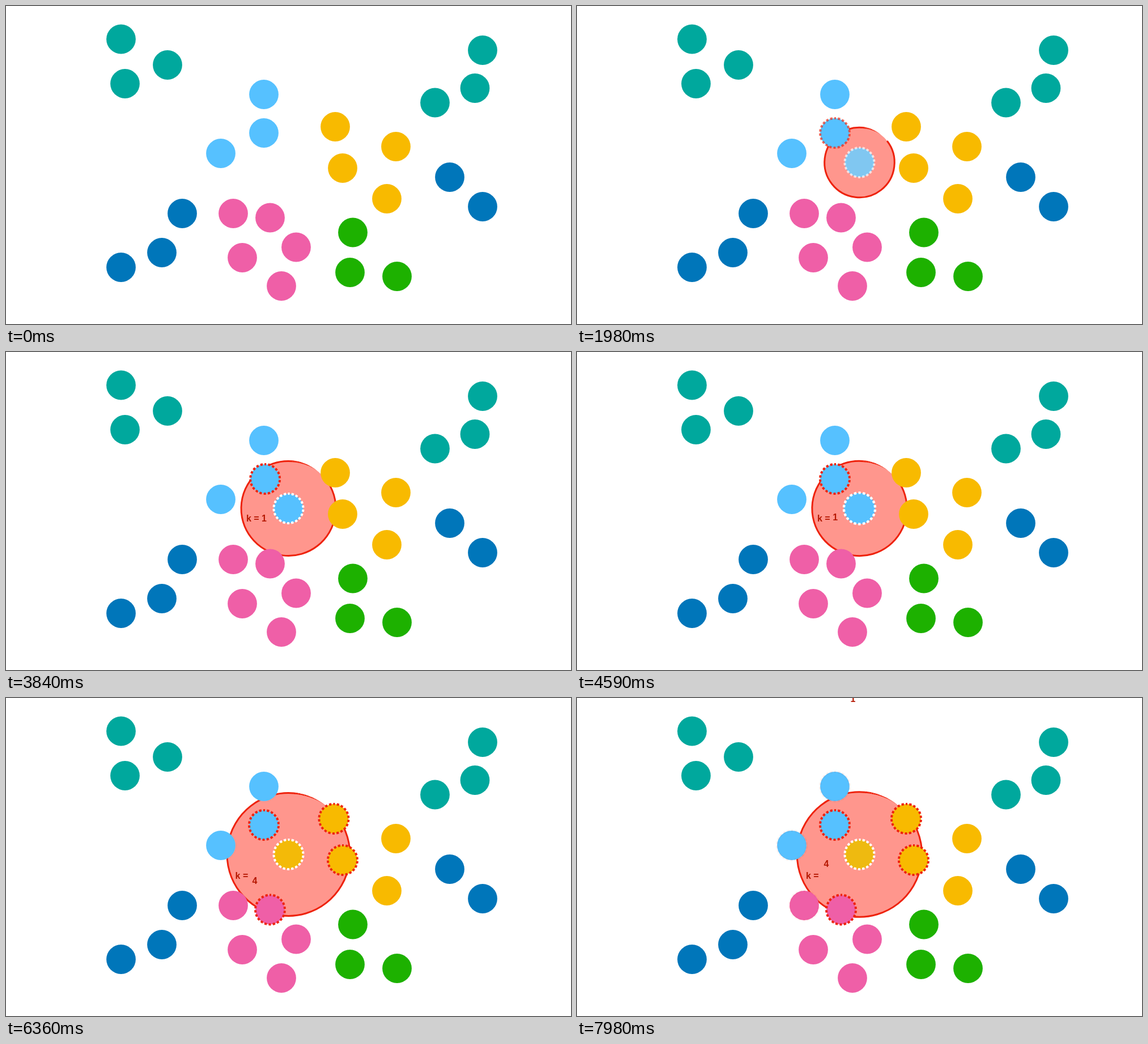
An HTML page with a canvas for the animation above (8 s loop, 997x561 px).

```html
<!DOCTYPE html>
<html lang="en">
<head>
<meta charset="utf-8">
<title>Nearest neighbours</title>
<style>
  html, body { margin: 0; width: 100%; height: 100%; overflow: hidden; background: #fff; }
  canvas { display: block; }
</style>
</head>
<body>
<canvas id="stage" width="997" height="561"></canvas>
<script>
const ctx = document.getElementById('stage').getContext('2d');
const LOOP = 8000, TAU = Math.PI * 2, R = 25.9;
const SKY = [86, 193, 255], GOLD = [248, 186, 0], GRAY = [211, 212, 214];
const RED = '#ee220c';
const center = { x: 498.5, y: 276 };

// Each dot: x, y, stage at which it becomes a neighbour, start of its jiggle
const groups = {
  '#00a89d': [[203, 58.5], [285, 104], [210, 137], [841, 78], [827.5, 145], [757, 170.5]],
  '#56c1ff': [[455, 156, 2], [455, 224, 0, 3630], [379, 260, 2]],
  '#f8ba00': [[581, 213, 1, 6318], [688, 248], [594, 286, 1, 6620], [672, 340]],
  '#0076ba': [[311, 366], [275, 435], [203, 461], [783, 302], [841, 354]],
  '#ef5fa7': [[401, 366, 2], [466, 373.5, 1], [417, 444], [512, 425.5], [486, 494]],
  '#1db100': [[612, 399.5], [607, 470], [690, 477]]
};

const clamp = v => Math.min(1, Math.max(0, v));
const ramp = (t, from, to) => clamp((t - from) / (to - from));
const lerp = (a, b, p) => a + (b - a) * p;
const mix = (a, b, p) => a.map((v, i) => lerp(v, b[i], p));
const ease = (t, middle) => 1 / (1 + Math.exp((middle - t) / 205));

function disc(x, y, r, color) {
  ctx.fillStyle = color;
  ctx.beginPath();
  ctx.arc(x, y, r, 0, TAU);
  ctx.fill();
}

function dottedRing(x, y, color, alpha, scale = 1) {
  if (alpha < 0.02) return;
  const period = TAU * 26 * scale / 22;
  ctx.save();
  ctx.globalAlpha = alpha;
  ctx.strokeStyle = color;
  ctx.lineWidth = 4 * scale;
  ctx.setLineDash([period * 0.56, period * 0.44]);
  ctx.lineDashOffset = period * 0.28;
  ctx.beginPath();
  ctx.arc(x, y, 26 * scale, -TAU / 4, TAU * 3 / 4);
  ctx.stroke();
  ctx.restore();
}

function jiggle(t, start) {
  const u = ramp(t, start, start + 600);
  return -3.5 * Math.sin(2 * TAU * u) * (1 - u);
}

function pulse(t, start) {
  return 0.2 * Math.sin(Math.PI * ramp(t, start, start + 500));
}

// Range circle whose outline thins out at the upper right
function rangeCircle(outer) {
  const rad = Math.PI / 180, r = outer - 1.5;
  disc(center.x, center.y, r, '#ff968d');
  const arc = (from, to, width) => {
    ctx.lineWidth = width;
    ctx.beginPath();
    ctx.arc(center.x, center.y, r, from * rad, to * rad);
    ctx.stroke();
  };
  ctx.strokeStyle = RED;
  arc(-38, 275, 3);
  for (let i = 0; i < 16; i++) arc(275 + i * 2, 277 + i * 2, 3 * (1 - i / 16));
}

function label(text, x, y) {
  ctx.fillText(text, x, y);
}

function draw(t) {
  const stages = [ease(t, 1840), ease(t, 5655), ease(t, 8530)];
  const [first, second, third] = stages;

  ctx.fillStyle = '#fff';
  ctx.fillRect(0, 0, 997, 561);

  if (t > 1020) rangeCircle(20 + 65 * first + 25.7 * second + 16 * third);

  for (const [color, dots] of Object.entries(groups)) {
    for (const [x, y, stage, shake] of dots) {
      const dx = shake ? jiggle(t, shake) : 0;
      disc(x + dx, y, R, color);
      if (stage !== undefined) dottedRing(x + dx, y, RED, stages[stage]);
    }
  }

  const fill = mix(mix(mix(GRAY, SKY, first), GOLD, second), SKY, third);
  const scale = 1 + pulse(t, 4140) + pulse(t, 7050);
  ctx.globalAlpha = ramp(t, 60, 600);
  disc(center.x, center.y, R * scale, `rgb(${fill.map(Math.round)})`);
  ctx.globalAlpha = 1;
  if (t > 1020) dottedRing(center.x, center.y, '#fff', first, scale);

  ctx.globalAlpha = ramp(t, 2850, 3390);
  ctx.fillStyle = '#b51700';
  ctx.font = 'bold 16px "Liberation Sans", Arial, sans-serif';
  label('k =', lerp(424, 404, second), lerp(299, 319.5, second));
  label('1', lerp(451, 486, second), lerp(299, -16, second));
  if (t > 4440) {
    const x = lerp(544, 431, second), y = lerp(603, 319.5, second);
    label('4', lerp(x, 500, third), lerp(y, -16, third));
  }
  if (t > 7680) label('1', lerp(486, 431, third), lerp(-14, 319.5, third));
  ctx.globalAlpha = 1;
}

const start = performance.now();
function tick() {
  draw((performance.now() - start) % LOOP);
  requestAnimationFrame(tick);
}
tick();
</script>
</body>
</html>
```
